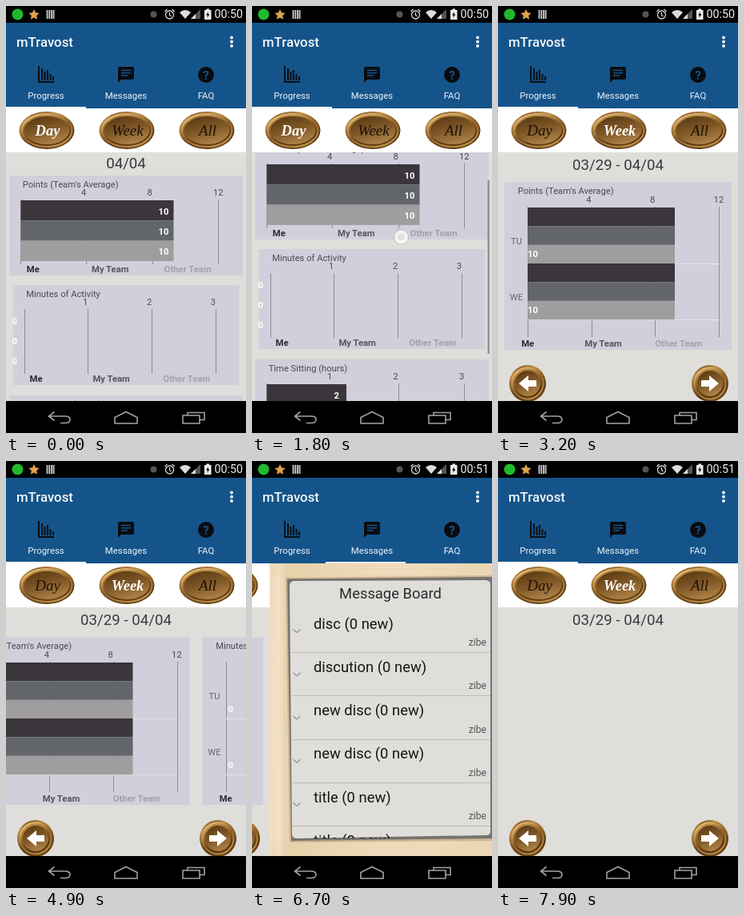
An HTML page for the animation above (8000 ms loop, 300 by 534 pixels).

```html
<!DOCTYPE html>
<html lang="en">
<head>
<meta charset="utf-8">
<title>Progress app</title>
<style>
  html, body { margin: 0; width: 100%; height: 100%; overflow: hidden; background: #000; }
  svg { display: block; width: 100%; height: 100%; font: 11.2px Roboto, sans-serif; }
  .bold { font-weight: 700; font-size: 11.3px; }
  .date { font-size: 18.7px; fill: #3b3b40; text-anchor: middle; }
  .row { font-size: 18.4px; fill: #161616; }
  .tab { font-size: 11.4px; fill: #eef3f8; text-anchor: middle; }
  .gold { font: italic 19px "Liberation Serif", serif; text-anchor: middle; fill: #1d130a; }
  .gold.on { font-weight: 700; font-size: 18.5px; fill: #fff; }
</style>
</head>
<body>
<svg viewBox="0 0 300 534">
  <defs>
    <linearGradient id="rim" x1=".3" y1="0" x2=".7" y2="1">
      <stop offset="0" stop-color="#80551f"/><stop offset=".16" stop-color="#bd8c45"/>
      <stop offset=".45" stop-color="#8d6027"/><stop offset=".75" stop-color="#56360f"/>
      <stop offset="1" stop-color="#6d4819"/>
    </linearGradient>
    <linearGradient id="ring" x1=".2" y1="0" x2=".8" y2="1">
      <stop offset="0" stop-color="#efc984"/><stop offset=".5" stop-color="#8f632a"/>
      <stop offset="1" stop-color="#c2924b"/>
    </linearGradient>
    <linearGradient id="face" x1=".3" y1="0" x2=".7" y2="1">
      <stop offset="0" stop-color="#5c3b13"/><stop offset=".5" stop-color="#825a28"/>
      <stop offset="1" stop-color="#b3854a"/>
    </linearGradient>
    <linearGradient id="wood">
      <stop offset="0" stop-color="#f0dfc2"/><stop offset=".04" stop-color="#f4e5cb"/>
      <stop offset=".07" stop-color="#e9d3ae"/><stop offset=".5" stop-color="#f1dfc1"/>
      <stop offset="1" stop-color="#ecd8b6"/>
    </linearGradient>
    <clipPath id="boardClip"><rect x="25" y="147" width="254" height="325"/></clipPath>
    <clipPath id="minutesClip"><rect x="8" y="340" width="290" height="140"/></clipPath>
  </defs>

  <g id="progress">
    <rect y="127" width="300" height="367" fill="#dfdeda"/>
    <g id="day"></g>
    <g id="week">
      <text class="date" x="150" y="205">03/29 - 04/04</text>
      <g id="weekCharts"></g>
      <g id="arrows"></g>
    </g>
    <rect y="127" width="300" height="56" fill="#fff"/>
    <g id="buttons"></g>
  </g>

  <g id="messages"></g>

  <rect id="scrollbar" x="294.5" width="2.5" height="217" fill="#85858a"/>
  <g id="touch">
    <circle r="9" fill="#fff" fill-opacity=".75" stroke="#aaa" stroke-opacity=".6"/>
    <circle r="4" fill="#d2d2d6" fill-opacity=".6"/>
  </g>

  <!-- status bar -->
  <rect width="300" height="21"/>
  <circle cx="14.5" cy="10.5" r="7" fill="#20b92c"/>
  <path d="M35 4l2 4.300 4.700.6-3.500 3.200.9 4.700-4.100-2.300-4.100 2.300.9-4.700-3.500-3.200 4.700-.6z" fill="#dfa24c"/>
  <path d="M51.500 5v11M54.300 5v11M57.100 5v11M59.600 5v11" stroke="#ccc" stroke-width="1.800"/>
  <circle cx="184.500" cy="10.500" r="4" fill="#555"/>
  <g fill="none" stroke="#d8d8d8" stroke-width="1.300">
    <circle cx="204.500" cy="11" r="5"/>
    <path d="M204.500 8v3.500l2 1.500M198.500 7l3-3M210.500 7l-3-3"/>
  </g>
  <path d="M217 8q7-6 14 0l-7 8z" fill="#ddd"/>
  <path d="M243 4v12h-12z" fill="#555"/>
  <path d="M237 10v6h-6z" fill="#ddd"/>
  <path d="M248 5h2.500v-1.500h3.500v1.500h2.500v12h-8.500z" fill="#eee"/>
  <path d="M253 7l-3 4.500h2l-.7 3.500 3.200-4.800h-2z"/>
  <text id="clock" x="260.500" y="15.300" font-size="14.300" fill="#eee"></text>

  <!-- app bar and tabs -->
  <rect y="21" width="300" height="107" fill="#15548a"/>
  <text x="13" y="50.500" font-size="16.800" font-weight="500" fill="#f4f7fa">mTravost</text>
  <g fill="#fff"><circle cx="282" cy="39.500" r="1.900"/><circle cx="282" cy="44.700" r="1.900"/><circle cx="282" cy="49.900" r="1.900"/></g>
  <path d="M41 75v20h19M45 78v15M48.500 82v11M52 80v13M55.500 85v8M59 88v5" fill="none" stroke="#0a0f14" stroke-width="2"/>
  <path d="M142 76h16q2 0 2 2v12q0 2-2 2h-14l-4 4v-18q0-2 2-2z" fill="#080c10"/>
  <path d="M144 80.500h12M144 83.800h12M144 87h8" stroke="#15548a" stroke-width="1.500"/>
  <circle cx="250" cy="86" r="10" fill="#080c10"/>
  <text x="250" y="91.500" font-size="15" font-weight="700" text-anchor="middle" fill="#15548a">?</text>
  <text class="tab" x="50" y="116">Progress</text>
  <text class="tab" x="150" y="116">Messages</text>
  <text class="tab" x="250" y="116">FAQ</text>
  <rect id="indicator" y="126" width="100" height="2" fill="#f2f6fa"/>

  <!-- navigation bar -->
  <rect y="494" width="300" height="40"/>
  <g fill="none" stroke="#a2a2a2" stroke-width="1.600">
    <path d="M60.500 507.500l-7 5.500 7 5.500M54 513h20q6 0 6 4.300t-6 4.200h-6"/>
    <path d="M136 522v-7.500l14-7 14 7v7.500z"/>
    <path d="M221 512h21v10h-21zM227 512v-3.500h21v9h-6"/>
  </g>
</svg>

<script>
const $ = id => document.getElementById(id);
const range = n => [...Array(n).keys()];
const label = (x, y, text, fill = '#4a4a50', cls = '', extra = '') =>
  `<text x="${x}" y="${y}" fill="${fill}" class="${cls}" ${extra}>${text}</text>`;
const box = (x, y, w, h, fill) => `<rect x="${x}" y="${y}" width="${w}" height="${h}" fill="${fill}"/>`;
const line = (x1, y1, x2, y2, stroke) =>
  `<path d="M${x1} ${y1}L${x2} ${y2}" stroke="${stroke}" shape-rendering="crispEdges"/>`;

const BAR_FILLS = ['#3b353c', '#626569', '#a09d9f'];
const bars = (x, y, w, h) => BAR_FILLS.map((fill, i) => box(x, y + i * h, w, h, fill)).join('');

// Panel with title, axis numbers, grid and legend; the bars go on top.
function chart({ x, y, w, h, axis, step, bottom, title, unit }, content) {
  const grid = range(4).map(i => {
    const gx = axis + i * step;
    return line(gx, y + 30, gx, y + bottom, '#8e8d95') +
      (i ? label(gx - 7, y + 25.4, i * unit) : '');
  }).join('');
  const legend = [['Me', .0745, '#2c2c30'], ['My Team', .353, '#56565b'], ['Other Team', .663, '#a3a2a8']]
    .map(([text, part, fill]) => label(x + w * part, y + h - 4.5, text, fill, 'bold')).join('');
  return box(x, y, w, h, '#d0cfdb') + label(x + 16.7, y + 14.7, title) + grid + legend + content;
}

function dayChart(x, y, title, unit, barWidth, value, valueEnd) {
  const w = 300 - 2 * x, axis = x + 14.5;
  const values = range(3).map(i =>
    label(valueEnd, y + 48.5 + i * 25.3, value, '#fff', 'bold', 'text-anchor="end"')).join('');
  return chart({ x, y, w, h: 125, axis, step: w * .2825, bottom: 111, title, unit },
    (barWidth ? bars(axis, y + 31, barWidth, 25.3) : '') + values);
}

function weekChart(title, unit, barWidth, value, valueX) {
  const days = ['TU', 'WE'].map((name, i) => {
    const y = 252 + i * 70;
    return label(23, y + 46, name, '#68686e', '', 'text-anchor="middle"') +
      line(37, y + 70.5, 276.5, y + 70.5, '#e6e5ea') +
      (barWidth ? bars(37, y, barWidth, 23.4) : '') +
      label(valueX, y + 62, value, '#fff', 'bold');
  }).join('');
  return chart({ x: 8, y: 220.5, w: 284, h: 209.5, axis: 37.5, step: 79.7, bottom: 193.5, title, unit }, days);
}

$('day').innerHTML = '<text class="date" x="150" y="203">04/04</text>' +
  dayChart(4, 212, "Points (Team's Average)", 4, 191, 10, 203.5) +
  `<g clip-path="url(#minutesClip)">${dayChart(8.5, 349, 'Minutes of Activity', 1, 0, 0, 14)}</g>` +
  dayChart(4, 487, 'Time Sitting (hours)', 1, 99.5, 2, 109);

$('weekCharts').innerHTML = weekChart("Points (Team's Average)", 4, 184, 10, 37) +
  `<g transform="translate(300)">${weekChart('Minutes of Activity', 1, 0, 0, 40)}</g>`;

const ellipse = (x, y, rx, ry, paint) => `<ellipse cx="${x}" cy="${y}" rx="${rx}" ry="${ry}" ${paint}/>`;
const goldOval = (x, y, rx, ry, rim) =>
  ellipse(x, y, rx, ry, 'fill="url(#rim)"') +
  ellipse(x, y, rx - rim * .5, ry - rim * .5, 'fill="none" stroke="url(#ring)" stroke-width="2.2"') +
  ellipse(x, y, rx - rim, ry - rim, 'fill="url(#face)"');

$('buttons').innerHTML = ['Day', 'Week', 'All'].map((name, i) =>
  goldOval(51 + i * 100, 155.5, 34.5, 23.5, 6) +
  `<text id="button${name}" class="gold" x="${52 + i * 100}" y="161.500">${name}</text>`).join('');

$('arrows').innerHTML = [[37, -1], [265, 1]].map(([x, side]) =>
  goldOval(x, 472, 23, 23, 7) +
  `<path transform="translate(${x} 472) scale(${side} 1)" fill="#fff"
     d="M-11 -4H-1V-10L11 0L-1 10V4H-11z"/>`).join('');

const rows = ['disc', 'discution', 'new disc', 'new disc', 'title', 'title'].map((name, i) => {
  const y = i * 54.25;
  return label(55, 209.7 + y, name + ' (0 new)', '#161616', 'row') +
    label(271, 231 + y, 'zibe', '#56565a', '', 'text-anchor="end" style="font-size:12.2px"') +
    line(27, 239.5 + y, 276, 239.5 + y, '#bdbbb7') +
    `<path d="M29.500 ${210.5 + y}l4.500 4 4.500-4" fill="none" stroke="#929292" stroke-width="1.300"/>`;
}).join('');
const grain = range(7).map(i =>
  `<path d="M${3 + i * 2.7} 127q${i % 3 - 1} 180 1 367M0 ${129 + i * 2.5}q150 ${i % 3 - 1} 300 0M0 ${477 + i * 2.5}q150 ${i % 3 - 1} 300 0"
     fill="none" stroke="#dfc59c" stroke-opacity=".35"/>`).join('');

$('messages').innerHTML = box(0, 127, 300, 367, 'url(#wood)') + grain +
  `<path d="M20 146L281 143L281 475L25 477z" fill="#cdb492"/>
   <path d="M22 147.500L278 145L279 472L27 475z" fill="#77736e"/>
   <path d="M25 156q0-6 6-6L270 149q6 0 6 6L276 463q0 5-5 5L34 472q-6 0-6-6z" fill="#dfdeda"/>
   <g clip-path="url(#boardClip)">` +
  label(151, 172, 'Message Board', '#2b2b2d', '', 'text-anchor="middle" style="font-size:18.4px"') + rows + '</g>';

// Linear interpolation through [time, value] pairs.
function track(t, keys) {
  const next = keys.findIndex(([time]) => time > t);
  if (next === 0) return keys[0][1];
  if (next < 0) return keys[keys.length - 1][1];
  const [t0, v0] = keys[next - 1], [t1, v1] = keys[next];
  return v0 + (v1 - v0) * (t - t0) / (t1 - t0);
}

const SCROLL = [[800, 0], [900, 8], [1000, 35], [1100, 80], [1200, 118], [1300, 135], [1400, 135],
  [1500, 127], [1600, 108], [1700, 78], [1800, 45], [1900, 16], [2000, 0]];
const TOUCH = [[900, 380], [1100, 307], [1400, 199], [1500, 207], [1800, 289], [2100, 345]];
const CHART_SWIPE = [[4600, 0], [4800, 25], [5000, 100], [5200, 215], [5300, 265], [5400, 290], [5500, 300]];
const PAGE_SWIPE = [[5900, 0], [6000, 6], [6200, 60], [6400, 150], [6600, 255], [6700, 278], [6800, 294],
  [6900, 300], [7000, 300], [7100, 270], [7200, 190], [7300, 90], [7400, 25], [7500, 0]];

const move = (id, x, y = 0) => $(id).setAttribute('transform', `translate(${x} ${y})`);
const show = (id, visible) => $(id).style.display = visible ? '' : 'none';

function draw(t) {
  const week = t >= 3000, scroll = track(t, SCROLL), page = track(t, PAGE_SWIPE);
  show('day', !week);
  show('week', week);
  $('buttonDay').classList.toggle('on', !week);
  $('buttonWeek').classList.toggle('on', week);
  move('day', 0, -scroll);

  show('touch', t >= 900 && t <= 2100);
  move('touch', 186.5, track(t, TOUCH));
  $('scrollbar').setAttribute('y', 186 + scroll * .71);
  $('scrollbar').setAttribute('opacity', track(t, [[800, 0], [900, .85], [2200, .85], [2500, 0]]));

  show('weekCharts', t >= 3200 && t < 7700);
  move('weekCharts', -track(t, CHART_SWIPE));

  move('progress', -page);
  move('messages', 300 - page);
  $('indicator').setAttribute('x', Math.floor(page / 3));
  $('clock').textContent = t < 6200 ? '00:50' : '00:51';
}

const start = performance.now();
function tick() {
  const t = (performance.now() - start) % 8000;
  draw(Math.floor(t / 100) * 100);   // the screen updates ten times a second
  requestAnimationFrame(tick);
}
tick();
</script>
</body>
</html>
```
